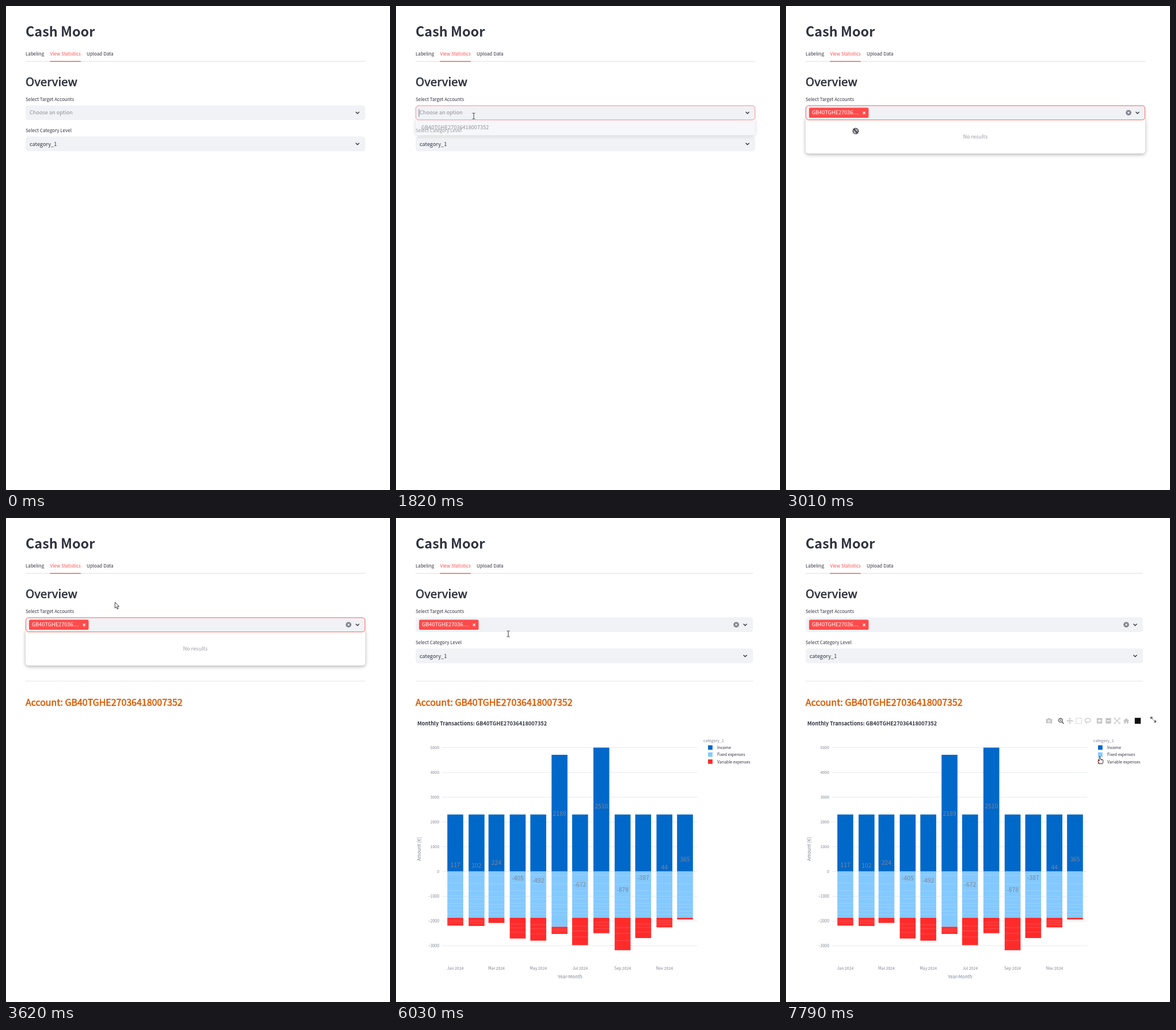
An HTML page for the animation above (7.99 s loop, 667 px wide and 840 px high).

```html
<!DOCTYPE html>
<html lang="en">
<head>
<meta charset="utf-8">
<title>Budget dashboard</title>
<style>
html, body { margin: 0; width: 100%; height: 100%; overflow: hidden; background: #fff; }
svg { display: block; width: 667px; height: 840px; font-family: "Noto Sans CJK JP", "Noto Sans CJK SC", "Noto Sans CJK", "Open Sans", sans-serif; }
.drop { filter: drop-shadow(0 2.5px 3.2px rgba(0, 0, 0, .3)); }
</style>
</head>
<body>
<svg id="stage" viewBox="0 0 667 840"></svg>
<script>
const LOOP = 7990;
const INK = '#31333f', RED = '#ff4b4b', GREY = '#808495', FIELD = '#f0f2f6';
const ACCOUNT = 'GB40TGHE27036418007352';
const LABEL = 8.05, BODY = 9.16, TICK = 6.9;
const FOCUS = 1750, PICK = 2740, HEADING = 3210, CHART = 3820, TOOLS = 6170;

const clamp = v => Math.max(0, Math.min(1, v));
const text = (x, y, s, size, fill = INK, more = '') =>
  `<text x="${x}" y="${y}" font-size="${size}" fill="${fill}" ${more}>${s}</text>`;
const rect = (x, y, w, h, fill, more = '') =>
  `<rect x="${x}" y="${y}" width="${w}" height="${h}" fill="${fill}" ${more}/>`;
const path = (d, stroke, width = 1, fill = 'none', more = '') =>
  `<path d="${d}" stroke="${stroke}" stroke-width="${width}" fill="${fill}" ${more}/>`;
const group = (s, more) => `<g ${more}>${s}</g>`;
const at = (x, y, s) => group(s, `transform="translate(${x} ${y})"`);
const BOLD = 'font-weight="700"', MIDDLE = 'text-anchor="middle"', END = 'text-anchor="end"';
// semibold: regular letters thickened by a thin outline
const heading = (x, y, s, size, fill) =>
  text(x, y, s, size, fill, `stroke="${fill}" stroke-width="${size * 0.035}" stroke-linejoin="round"`);

// ---- chart ----
const yOf = v => 613.5 - v * 0.043;
const xOf = month => 103 + 1.191 * (Date.UTC(2024, month) - Date.UTC(2024, 0)) / 864e5;
const net = [117, 102, 224, -405, -492, 2189, -672, 2510, -878, -387, 44, 365];

function drawChart() {
  let s = text(37, 359.6, 'Monthly Transactions: ' + ACCOUNT, 9.15, INK, BOLD);
  for (let v = -3000; v <= 5000; v += 1000) {
    s += path(`M80 ${yOf(v)}H523.5`, '#e6eaf1');
    s += text(75, yOf(v) + 2.6, String(v).replace('-', '−'), TICK, GREY, END);
  }
  const bar = (x, from, to, fill) => rect(x - 13.8, yOf(from), 27.6, yOf(to) - yOf(from), fill);
  const seam = (x, y) => path(`M${x - 13.8} ${y}h27.6`, '#fff', 0.6, 'none', 'opacity=".27"');
  net.forEach((n, m) => {
    const x = xOf(m);
    const income = m == 5 ? 4710 : m == 7 ? 5000 : 2300;
    const fixed = m == 5 ? -2232 : -1870;
    const low = n - income;
    s += bar(x, income, 0, '#0068c9') + bar(x, 0, fixed, '#83c9ff') + bar(x, fixed, low, '#ff2b2b');
    for (const dy of [5, 20, 33, 42, 47, 55, 60, 67, 73]) s += seam(x, yOf(0) + dy + m * 7 % 3);
    for (const part of [0.3, 0.48, 0.7])
      if (fixed - low > 250) s += seam(x, yOf(fixed + (low - fixed) * part));
  });
  net.forEach((n, m) => s += text(xOf(m), yOf(n) - 2, n, 10.3, GREY, MIDDLE));
  ['Jan', 'Mar', 'May', 'Jul', 'Sep', 'Nov'].forEach((name, i) =>
    s += text(xOf(i * 2), 783.6, name + ' 2024', TICK, GREY, MIDDLE));
  s += text(302.5, 799, 'Year-Month', 8, GREY, MIDDLE);
  s += text(0, 0, 'Amount [€]', 8, GREY, MIDDLE + ' transform="translate(43 574.5) rotate(-90)"');
  s += text(534, 389, 'category_1', TICK, GREY);
  [['Income', '#0068c9'], ['Fixed expenses', '#83c9ff'], ['Variable expenses', '#ff2b2b']].forEach(([name, fill], i) => {
    const y = 398.4 + i * 12.2;
    s += rect(542, y - 3.9, 7.8, 7.8, fill) + text(558, y + 2.7, name, TICK);
  });
  return s;
}

function drawTools() {
  const c = '#c4c4c4', y = 352;
  const line = (d, w = 1, color = c) => path(d, color, w);
  return [
    [457, path('M-5 -3h2.5l1-1.5h3l1 1.5h2.5v7h-10z', c, 0.5, c) + '<circle cy=".6" r="2.3" fill="#fff"/><circle cy=".6" r="1.2" fill="#c4c4c4"/>'],
    [477.5, '<circle cx="-.8" cy="-.8" r="3.3" fill="none" stroke="#757575" stroke-width="1.6"/>' + line('M1.6 1.6L5 5', 1.9, '#757575') + line('M-2.6 -.8h3.6M-.8 -2.6v3.6', 0.9, '#757575')],
    [493, line('M-5 0H5M0 -5V5', 1.3) + line('M-3.5 -1.6L-5 0l1.5 1.6M3.5 -1.6L5 0l-1.5 1.6M-1.6 -3.5L0 -5l1.6 1.5M-1.6 3.5L0 5l1.6 -1.5')],
    [508.5, path('M-4.7 -4.7h9.4v9.4h-9.4z', c, 1.1, 'none', 'stroke-dasharray="2 1.1"')],
    [524, line('M-2.5 2.2C-7 0 -4 -4.3 0.5 -4.3S6.5 0 3.5 1.8S-2.5 1 -3 2.5S-1 4 -2 5', 1.2)],
    [544.5, rect(-4.7, -4.7, 9.4, 9.4, c, 'rx="1"') + line('M-3 0h6M0 -3v6', 1.4, '#fff')],
    [560, rect(-4.7, -4.7, 9.4, 9.4, c, 'rx="1"') + line('M-3 0h6', 1.4, '#fff')],
    [575, line('M-3.5 -3.5l7 7M3.5 -3.5l-7 7', 1.2) + line('M-5 -2.5V-5h2.5M2.5 -5H5v2.5M5 2.5V5H2.5M-2.5 5H-5V2.5', 1.1)],
    [591, path('M-5 0L0 -4.6L5 0H3.6V4.5H1V1.5H-1V4.5H-3.6V0z', c, 0.3, c)],
    [611, rect(-5.2, -5.2, 10.4, 10.4, '#111')],
    [638, at(0, -2, line('M-4.3 -1V-4.3H-1M-4 -4L-.6 -.6M4.3 1V4.3H1M4 4L.6 .6', 1.3, '#606168'))]
  ].map(([x, icon]) => at(x, y, icon)).join('');
}

const chart = drawChart(), tools = drawTools();

// ---- pointer ----
const shapes = {
  arrow: path('M0 0V10.2L2.4 8L4 11.8L5.7 11L4.1 7.4H7.2z', '#222', 0.9, '#fff'),
  beam: path('M-2.8 -5H-.6L0 -4.5L.6 -5H2.8M0 -4.5V4.5M-2.8 5H-.6L0 4.5L.6 5H2.8', '#fff', 2.4) +
    path('M-2.8 -5H2.8M0 -5V5M-2.8 5H2.8', '#555', 1.2),
  hand: path('M-1 .8Q0 -.4 1 .8V5L5.2 6Q6.3 6.4 6 8L5 13H-.4L-3 9Q-3.4 7.4 -2 7.6L-1 8.4z', '#222', 0.9, '#fff') +
    path('M2.4 5.4V7.4M4.1 5.8V7.6', '#222', 0.6),
  barred: '<circle r="5.6" fill="#fff"/><circle r="4.5" fill="none" stroke="#2b2b33" stroke-width="2.2" stroke-dasharray="1.5 .7"/>' +
    path('M-3.6 -3.6L3.6 3.6', '#2b2b33', 2) + path('M-.6 -3.4L3.4 .6M-3.4 -.6L.6 3.4', '#2b2b33', 0.9)
};
// time, x, y, shape held until the next key
const keys = [
  [90, 618, 817, 'arrow'], [300, 430, 560, 'arrow'], [500, 265, 330, 'arrow'], [700, 172, 215, 'beam'],
  [840, 151, 190, 'beam'], [910, 147, 183, 'beam'], [1000, 132, 166, 'arrow'], [1180, 128, 164, 'arrow'],
  [1230, 130, 176, 'beam'], [1330, 135, 196, 'beam'], [1530, 135, 196, 'beam'], [1600, 135, 191, 'beam'],
  [2260, 135, 191, 'beam'], [2340, 131, 200, 'hand'], [2540, 121, 217, 'hand'], [PICK, 121, 217, 'barred'],
  [3090, 121, 217, 'barred'], [3170, 135, 195, 'beam'], [3250, 150, 168, 'arrow'], [3400, 178, 124, 'arrow'],
  [3550, 187, 138, 'arrow'], [3620, 189.3, 146.3, 'arrow'], [6029, 189.3, 146.3, 'arrow'], [6030, 195, 201, 'beam'],
  [6090, 195, 201, 'beam'], [6170, 212, 290, 'arrow'], [6350, 285, 465, 'arrow'], [6450, 350, 490, 'arrow'],
  [6600, 460, 450, 'arrow'], [6770, 560, 386, 'arrow'], [6840, 560, 386, 'hand'], [7190, 545, 398, 'hand'],
  [7720, 545, 398, 'hand'], [7790, 545, 413.5, 'hand'], [LOOP, 545, 413.5, 'hand']
];

function pointer(t) {
  const i = keys.findIndex(k => k[0] > t);
  if (i < 1) return '';
  const [t0, x0, y0, shape] = keys[i - 1], [t1, x1, y1] = keys[i];
  const p = (t - t0) / (t1 - t0);
  return at(x0 + (x1 - x0) * p, y0 + (y1 - y0) * p, shapes[shape]);
}

// ---- page ----
const chevron = (x, y) => path(`M${x - 3} ${y - 1.6}l3 3l3 -3`, INK, 1.4);
const field = (y, right) => rect(34, y, right - 34, 25.5, FIELD, 'rx="5"') + chevron(right - 13.5, y + 12.7);

function menu(t) {
  if (t < FOCUS || t >= CHART) return '';
  if (t >= PICK)
    return rect(34, 192, 590, 64, '#fff', 'rx="5" class="drop"') + text(328.8, 230.3, 'No results', BODY, '#9c9da5', MIDDLE);
  const option = rect(34, 192, 590, 32, '#fff', 'rx="5" class="drop"') + rect(34, 198, 590, 25.6, FIELD, 'rx="3"') +
    text(44, 214.3, ACCOUNT, BODY);
  return group(option, `opacity="${clamp((t - FOCUS + 15) / 160)}"`);
}

function accounts(t, right) {
  let s = field(172.6, right);
  if (t >= FOCUS && t < CHART)
    s += rect(34.4, 173, right - 34.8, 24.7, 'none', `rx="5" stroke="${RED}" stroke-width=".9" opacity="${clamp((t - FOCUS + 30) / 150)}"`);
  if (t < PICK) {
    if (t >= FOCUS) s += path('M40 179V192', INK, 0.7);
    return s + text(41, 188.4, 'Choose an option', BODY, '#8f9097');
  }
  return s + rect(40, 176.5, 103.5, 17.6, RED, 'rx="2.6"') +
    text(45, 188.4, ACCOUNT.slice(0, 13) + '…', BODY, '#fff') +
    path('M133.6 183.5l4 4M137.6 183.5l-4 4', '#fff', 1.2) +
    `<circle cx="${right - 29}" cy="185.2" r="4.8" fill="#7f818c"/>` +
    path(`M${right - 30.7} 183.5l3.4 3.4m0 -3.4l-3.4 3.4`, FIELD, 1.1);
}

function page(t) {
  const right = t < CHART ? 624 : 620;
  const rule = y => path(`M34 ${y}H${right}`, '#e2e3e7', 1.2);
  let s = text(34, 53, 'Cash Moor', 23.4, INK, BOLD) +
    text(34, 86, 'Labeling', LABEL) + text(76.5, 86, 'View Statistics', LABEL, RED) + text(140, 86, 'Upload Data', LABEL) +
    rule(96.2) + rect(76.3, 95.6, 53.5, 1.3, RED) +
    heading(34, 138.6, 'Overview', 20.5, INK) +
    text(34, 164.6, 'Select Target Accounts', LABEL) +
    text(34, 219, 'Select Category Level', LABEL) +
    field(226.6, right) + text(41, 242.6, 'category_1', BODY) +
    menu(t) + accounts(t, right);
  if (t >= HEADING) s += rule(283) + heading(34, 326, 'Account: ' + ACCOUNT, 15.95, '#d95a00');
  if (t >= CHART) s += chart;
  if (t >= TOOLS) s += group(tools, `opacity="${clamp((t - TOOLS) / 200)}"`);
  return s + pointer(t);
}

const stage = document.getElementById('stage');
const start = performance.now();
function tick() {
  stage.innerHTML = page((performance.now() - start) % LOOP);
  requestAnimationFrame(tick);
}
tick();
</script>
</body>
</html>
```
